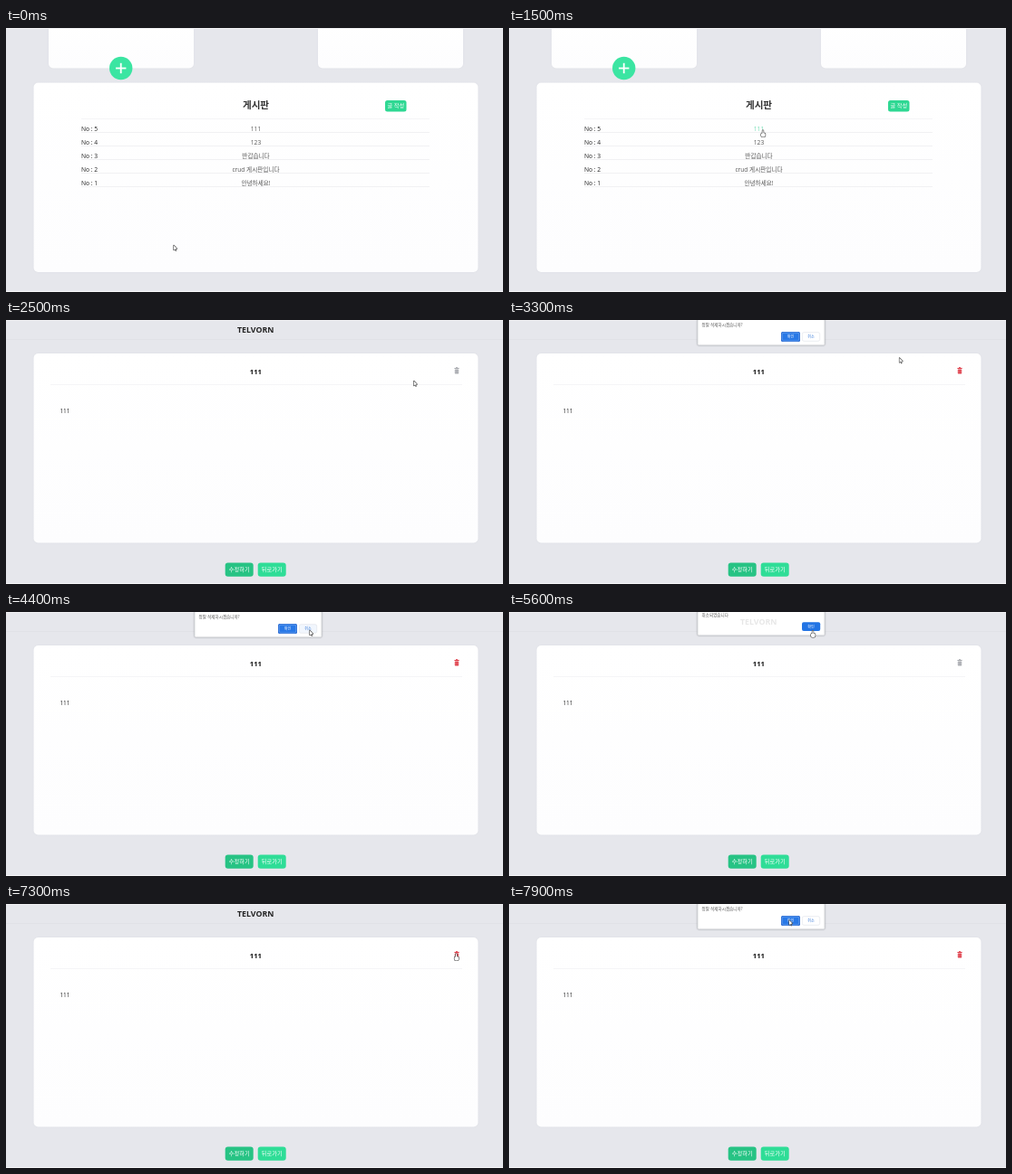
Write an HTML page with a canvas that moves like this. It is 548 by 292 pixels and loops after 8000 ms.

```html
<!DOCTYPE html>
<html lang="ko">
<head>
<meta charset="utf-8">
<title>게시판</title>
<style>
html, body { margin: 0; width: 100%; height: 100%; overflow: hidden; background: #e6e7ec; }
canvas { display: block; width: 548px; height: 292px; }
</style>
</head>
<body>
<canvas id="stage"></canvas>
<script>
const W = 548, H = 292, LOOP = 8000, STEP = 100;
const FONT = '"Open Sans", "Noto Sans CJK KR", "Noto Sans CJK", sans-serif';
const canvas = document.getElementById('stage');
const g = canvas.getContext('2d');
const dpr = window.devicePixelRatio || 1;
canvas.width = W * dpr;
canvas.height = H * dpr;

const BRAND = 'TELVORN';
const POSTS = ['111', '123', '반갑습니다', 'crud 게시판입니다', '안녕하세요!'];

const REST = { x: 185, y: 240.5 };
const POST = { x: 280, y: 113 };
const BIN = { x: 496.5, y: 55 };
const YES = { x: 309, y: 18 };
const NO = { x: 335, y: 20.5 };
const CARD = { x: 353, y: 91 };

// Each move glides from wherever the pointer is to a place
const MOVES = [
  { to: POST, from: 200, until: 1200 },
  { to: BIN, from: 1800, until: 2800 },
  { to: YES, from: 3100, until: 3600 },
  { to: NO, from: 3900, until: 4300 },
  { to: CARD, from: 5700, until: 6500 },
  { to: BIN, from: 6500, until: 7100 },
  { to: YES, from: 7400, until: 7800 }
];

function pointer(t) {
  let { x, y } = REST;
  for (const { to, from, until } of MOVES) {
    const k = Math.min(1, Math.max(0, (t - from) / (until - from)));
    const e = k * k * (3 - 2 * k);
    x += (to.x - x) * e;
    y += (to.y - y) * e;
  }
  return { x, y };
}

function box(x, y, w, h, r, fill, stroke) {
  g.beginPath();
  g.roundRect(x, y, w, h, r);
  g.fillStyle = fill;
  g.fill();
  if (stroke) {
    g.strokeStyle = stroke;
    g.lineWidth = 0.6;
    g.stroke();
  }
}

function text(s, x, y, size, color, weight = 400, align = 'center') {
  g.font = `${weight} ${size}px ${FONT}`;
  g.textAlign = align;
  g.fillStyle = color;
  g.fillText(s, x, y);
}

function rule(x0, x1, y, color) {
  g.fillStyle = color;
  g.fillRect(x0, y, x1 - x0, 1);
}

function shadow(color, blur, draw) {
  g.save();
  g.shadowColor = color;
  g.shadowBlur = blur * dpr;
  draw();
  g.restore();
}

function card(x, y, w, h) {
  const fade = g.createLinearGradient(0, y, 0, y + h);
  fade.addColorStop(0, '#ffffff');
  fade.addColorStop(1, '#fdfdfe');
  shadow('rgba(90,95,120,.08)', 2, () => box(x, y, w, h, 5, fade));
}

function button(label, x, y, w, h, size, fill, color = '#fff', stroke) {
  box(x, y, w, h, h / 5, fill, stroke);
  text(label, x + w / 2, y + h / 2 + size * 0.36, size, color);
}

function inside(p, x, y, w, h) {
  return p.x >= x && p.x <= x + w && p.y >= y && p.y <= y + h;
}

function board(p) {
  let hand = false;
  for (const x of [47, 344]) card(x, -10, 160, 54.5);

  g.beginPath();
  g.arc(126.7, 44.5, 12.7, 0, Math.PI * 2);
  g.fillStyle = '#3be5a2';
  g.fill();
  g.fillStyle = '#fff';
  g.fillRect(121, 43.6, 11.4, 1.8);
  g.fillRect(125.8, 38.8, 1.8, 11.4);

  card(30.5, 60.5, 490, 209.5);
  text('게시판', 275.5, 89, 10.6, '#333', 700);
  button('글 작성', 418, 80, 23.5, 12.5, 6.2, '#2fd893');

  rule(83, 467, 100, '#f5f5f7');
  POSTS.forEach((post, i) => {
    const y = 114 + i * 15;
    text('No : ' + (5 - i), 83, y, 6.7, '#222', 400, 'left');
    const w = g.measureText(post).width;
    const over = inside(p, 275.5 - w / 2, y - 6, w, 8);
    hand = hand || over;
    text(post, 275.5, y, 6.6, over ? '#6fdcb2' : '#555');
    rule(83, 467, y + 1, '#f1f1f3');
  });
  return hand;
}

function trash(hot) {
  const color = hot ? '#e0404c' : '#a9abb0';
  g.fillStyle = color;
  g.fillRect(494.4, 53, 5.2, 1);
  g.fillRect(496, 52.2, 2, 1);
  box(494.8, 54.4, 4.4, 5, 0.6, color);
  g.fillStyle = 'rgba(255,255,255,.45)';
  for (let i = 0; i < 3; i++) g.fillRect(495.6 + i * 1.2, 55.2, 0.4, 3.3);
}

function detail(hot, showTitle) {
  rule(0, W, 21, '#e0e1e6');
  if (showTitle) text(BRAND, 275.2, 14, 8.8, '#222', 700);
  card(30.5, 37, 490, 209.5);
  text('111', 275.3, 60, 7.6, '#111', 700);
  rule(49, 503, 71, '#f5f5f7');
  text('111', 59.4, 103.3, 6.5, '#222', 400, 'left');
  trash(hot);
  button('수정하기', 241.7, 268.5, 31, 15.3, 6.2, '#27c384');
  button('뒤로가기', 277.7, 268.5, 31, 15.3, 6.2, '#2fdd97');
}

function panel(bottom, message) {
  shadow('rgba(0,0,0,.2)', 2, () => box(207.8, -8, 140.4, bottom + 8, 1.5, '#fff', '#c2c4c9'));
  text(message, 212.6, bottom - 21.2, 4.55, '#555', 400, 'left');
}

function confirmBox(p) {
  panel(28, '정말 삭제하시겠습니까?');
  box(300, 13, 21, 11, 1.5, '#2a6cd4');
  button('확인', 301.2, 14.1, 18.6, 8.8, 4.1, '#2878e6', '#fff', '#7fb0f4');
  const over = inside(p, 323, 13, 20, 11);
  button('취소', 323.3, 13.7, 19.4, 9.6, 4.1, over ? '#f1f6fd' : '#fff', '#3f7fda', '#dde1e8');
}

function alertBox(fading) {
  panel(26, '취소되었습니다');
  button('확인', 323, 11.3, 20.2, 9.6, 4.1, '#2274e4');
  if (fading) text(BRAND, 275.2, 14, 8.8, 'rgba(34,34,34,.11)', 700);
}

function outline(draw) {
  g.beginPath();
  draw();
  g.closePath();
  g.strokeStyle = '#444';
  g.lineWidth = 1.2;
  g.lineJoin = 'round';
  g.stroke();
  g.fillStyle = '#fff';
  g.fill();
}

function cursor(p, hand) {
  g.save();
  g.translate(p.x, p.y);
  if (hand) {
    outline(() => {
      g.roundRect(-0.6, 0, 1.2, 5, 0.6);
      g.roundRect(-2, 3.2, 4.6, 4.2, 1.4);
    });
  } else {
    outline(() => {
      g.moveTo(0, 0);
      g.lineTo(0, 5);
      g.lineTo(1.4, 3.9);
      g.lineTo(2.3, 5.8);
      g.lineTo(2, 3.7);
      g.lineTo(3.5, 3.6);
    });
  }
  g.restore();
}

function draw(t) {
  g.setTransform(dpr, 0, 0, dpr, 0, 0);
  g.fillStyle = '#e6e7ec';
  g.fillRect(0, 0, W, H);
  const p = pointer(t);
  const asking = (t >= 3000 && t < 4700) || t >= 7400;
  const telling = t >= 4800 && t < 5700;
  const overBin = inside(p, 493, 51, 8, 9);
  let hand;
  if (t < 1700) {
    hand = board(p);
  } else {
    const hot = overBin || asking || (t >= 3000 && t < 5500);
    detail(hot, !asking && !telling);
    hand = (overBin && !asking) || (t >= 5500 && t < 5800);
  }
  rule(0, W, 0, '#f1f1f4');
  rule(0, W, 291, '#f6f6f8');
  if (asking) confirmBox(p);
  if (telling) alertBox(t >= 5600);
  cursor(p, hand);
}

const start = performance.now();
function tick() {
  const t = (performance.now() - start) % LOOP;
  draw(Math.floor(t / STEP) * STEP);
  requestAnimationFrame(tick);
}
tick();
</script>
</body>
</html>
```
